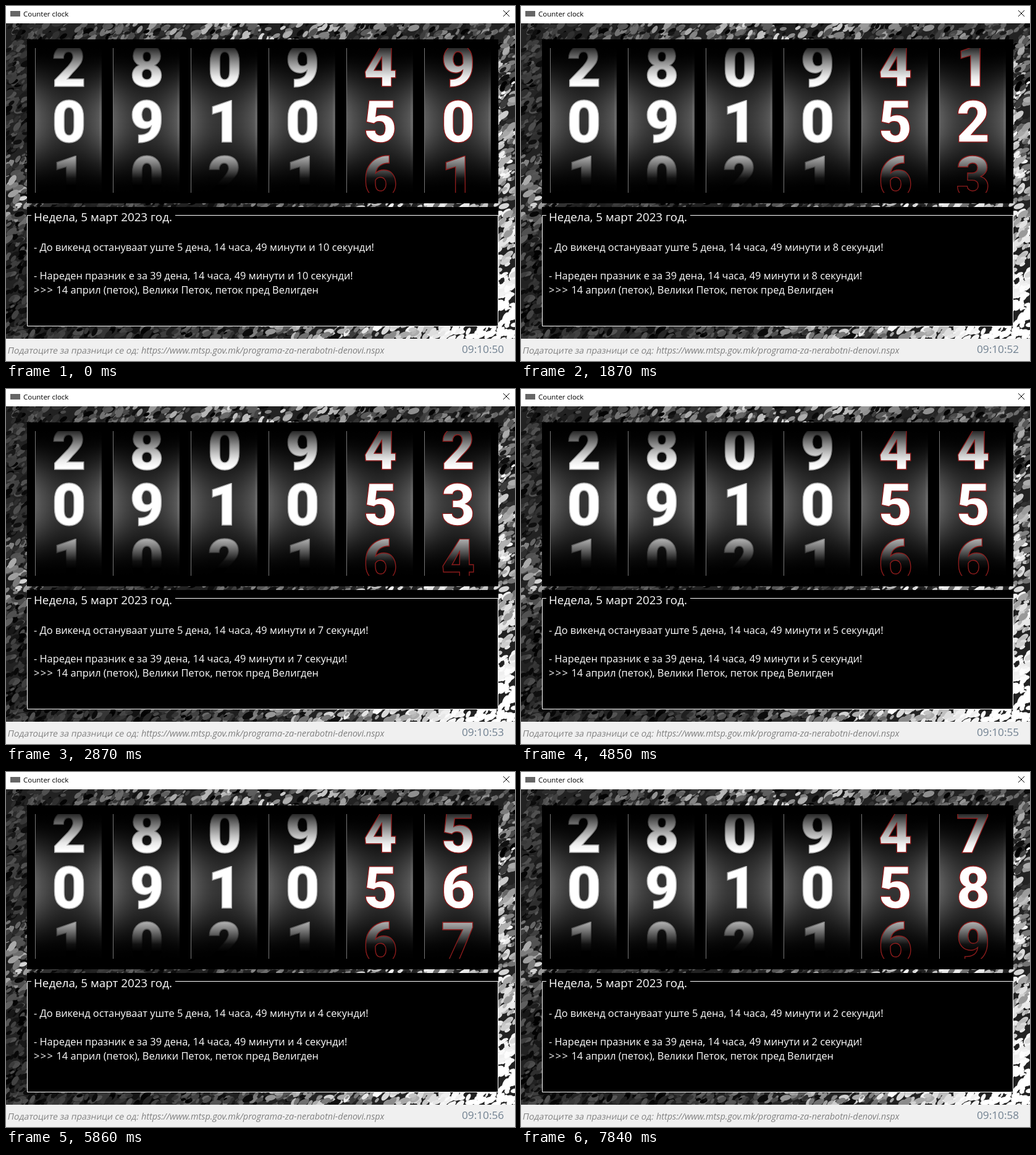
Recreate the animation shown at these times as an HTML page with a canvas. Size 824 by 574 pixels, loop 8 s.

```html
<!DOCTYPE html>
<html lang="mk">
<head>
<meta charset="utf-8">
<title>Counter clock</title>
<style>
  html, body { margin: 0; width: 100%; height: 100%; overflow: hidden; background: #000; }
  canvas, svg { position: absolute; left: 0; top: 0; display: block; }
  text { font-family: "Open Sans", "Noto Sans", sans-serif; white-space: pre; }
  .title { font-size: 11.5px; }
  .date { font-size: 18.8px; fill: #fff; }
  .line { font-size: 16.38px; fill: #fff; }
  .arrows { letter-spacing: 1.4px; }
  .note { font-size: 14px; fill: #808080; }
  .link { font-size: 14.43px; font-style: italic; fill: #808080; }
  .clock { font-size: 17.2px; fill: #708090; }
  .digit { font: 900 95px Roboto, Arial, sans-serif; text-anchor: middle;
           fill: url(#ink); stroke: url(#rim); stroke-width: 1.4; }
  .red { stroke: #8c1c1c; }
</style>
</head>
<body>
<canvas id="photo" width="824" height="574"></canvas>
<svg width="824" height="574" viewBox="0 0 824 574">
  <defs id="defs">
    <clipPath id="window"><rect x="34" y="68" width="763" height="234"/></clipPath>
  </defs>

  <rect width="824" height="28" fill="#fff"/>
  <rect x="7" y="8" width="16" height="9" fill="#666"/>
  <text class="title" x="28" y="17">Counter clock</text>
  <path d="M805 7l10 10M815 7l-10 10" stroke="#000" fill="none"/>

  <rect x="34" y="54" width="763" height="265"/>
  <g id="reels" clip-path="url(#window)"></g>

  <rect x="34" y="325" width="763" height="193"/>
  <path d="M41 338.5H34.5V517.5H796.5V338.5H274" fill="none" stroke="#fff"/>
  <text class="date" x="45" y="348">Недела, 5 март 2023 год.</text>
  <text class="line" id="weekend" x="45" y="396"></text>
  <text class="line" id="holiday" x="45" y="442"></text>
  <text class="line" x="45" y="465"><tspan class="arrows">&gt;&gt;&gt;</tspan> 14 април (петок), Велики Петок, петок пред Велигден</text>

  <rect y="538" width="824" height="36" fill="#f0f0f0"/>
  <text class="note" transform="translate(2 562) skewX(-11)">Податоците за празници се од:</text>
  <text class="link" x="219" y="562">https://www.mtsp.gov.mk/programa-za-nerabotni-denovi.nspx</text>
  <text class="clock" id="clock" x="738" y="561"></text>
</svg>
<script>
const LOOP = 8000, TICK = 994, LEAD = 121;
const TOP = 68, HEIGHT = 234, WIDTH = 108, PITCH = 126, ROW = 90;
const byId = id => document.getElementById(id);
const grey = v => `rgb(${v},${v},${v})`;

function add(parent, tag, attrs, text = '') {
  const el = document.createElementNS('http://www.w3.org/2000/svg', tag);
  for (const k in attrs) el.setAttribute(k, attrs[k]);
  el.textContent = text;
  parent.append(el);
  return el;
}

// Woodland: leaves toned by a few soft pools of light
function paintPhoto() {
  const c = byId('photo').getContext('2d');
  let seed = 7;
  const rnd = () => (seed = seed * 16807 % 2147483647) / 2147483647;
  const glow = (x, y, r) => Math.exp(-(x * x + y * y) / (r * r));
  const tone = (x, y) => 42
    + 70 * glow(x - 400, y - 30, 230)
    + 80 * glow(x - 10, y - 300, 50)
    + 60 * glow(x - 810, y - 170, 120)
    + 230 * glow(x - 830, y - 560, 300);

  c.fillStyle = grey(34);
  c.fillRect(0, 0, 824, 574);
  for (let i = 0; i < 9000; i++) {
    const x = rnd() * 824, y = 28 + rnd() * 510, r = 3 + rnd() * 7;
    const v = tone(x, y), spread = Math.max(0, Math.min(v, 255 - v));
    c.fillStyle = grey(v + (rnd() * 2 - 1) * spread);
    c.beginPath();
    c.ellipse(x, y, r, r * .5, 2 + rnd(), 0, 7);
    c.fill();
  }
}

function gradient(id, attrs, color) {
  const g = add(byId('defs'), 'linearGradient', { id, ...attrs }), steps = 20;
  for (let i = 0; i <= steps; i++) {
    add(g, 'stop', { offset: i / steps, 'stop-color': color(i / steps) });
  }
}

function buildGradients() {
  const down = { x1: 0, x2: 0, y1: TOP, y2: TOP + HEIGHT, gradientUnits: 'userSpaceOnUse' };
  const light = u => Math.max(0, Math.min(1, 1.3 * Math.cos(3.3 * (u - .44))));
  gradient('ink', down, u => grey(255 * light(u)));
  gradient('rim', down, u => grey(175 * light(u)));
  gradient('drum', {}, u => grey(52 + 44 * (2 * u - 1) ** 2));
  gradient('shade', down, u => `rgba(0,0,0,${1 - Math.sin(Math.PI * u) ** 2})`);
}

function buildReel({ value, max, red }, i) {
  const reels = byId('reels'), x = 47 + PITCH * i;
  const bar = (dx, width, fill) => add(reels, 'rect', { x: x + dx, y: TOP, width, height: HEIGHT, fill });
  bar(0, WIDTH, 'url(#drum)');
  bar(WIDTH - 4, 3, '#686868');
  bar(0, WIDTH, 'url(#shade)');
  bar(0, 1, '#767676');
  const digits = [-1, 0, 1].map(row => add(reels, 'text',
    { x: x + 55, y: 220 + ROW * row, class: red ? 'digit red' : 'digit' }));
  const show = n => digits.forEach((el, k) => el.textContent = (n + k + max) % (max + 1));
  show(value);
  return show;
}

paintPhoto();
buildGradients();
const reels = [...'091050'].map((d, i) =>
  buildReel({ value: +d, max: i ? 9 : 2, red: i > 3 }, i));

let shown = -1;
function frame(now) {
  const n = Math.floor((now % LOOP + LEAD) / TICK);
  if (n !== shown) {
    shown = n;
    const left = `14 часа, 49 минути и ${10 - n} секунди!`;
    byId('weekend').textContent = `- До викенд остануваат уште 5 дена, ${left}`;
    byId('holiday').textContent = `- Нареден празник е за 39 дена, ${left}`;
    byId('clock').textContent = `09:10:${50 + n}`;
    reels[5](n);
  }
  requestAnimationFrame(frame);
}
frame(performance.now());
</script>
</body>
</html>
```
